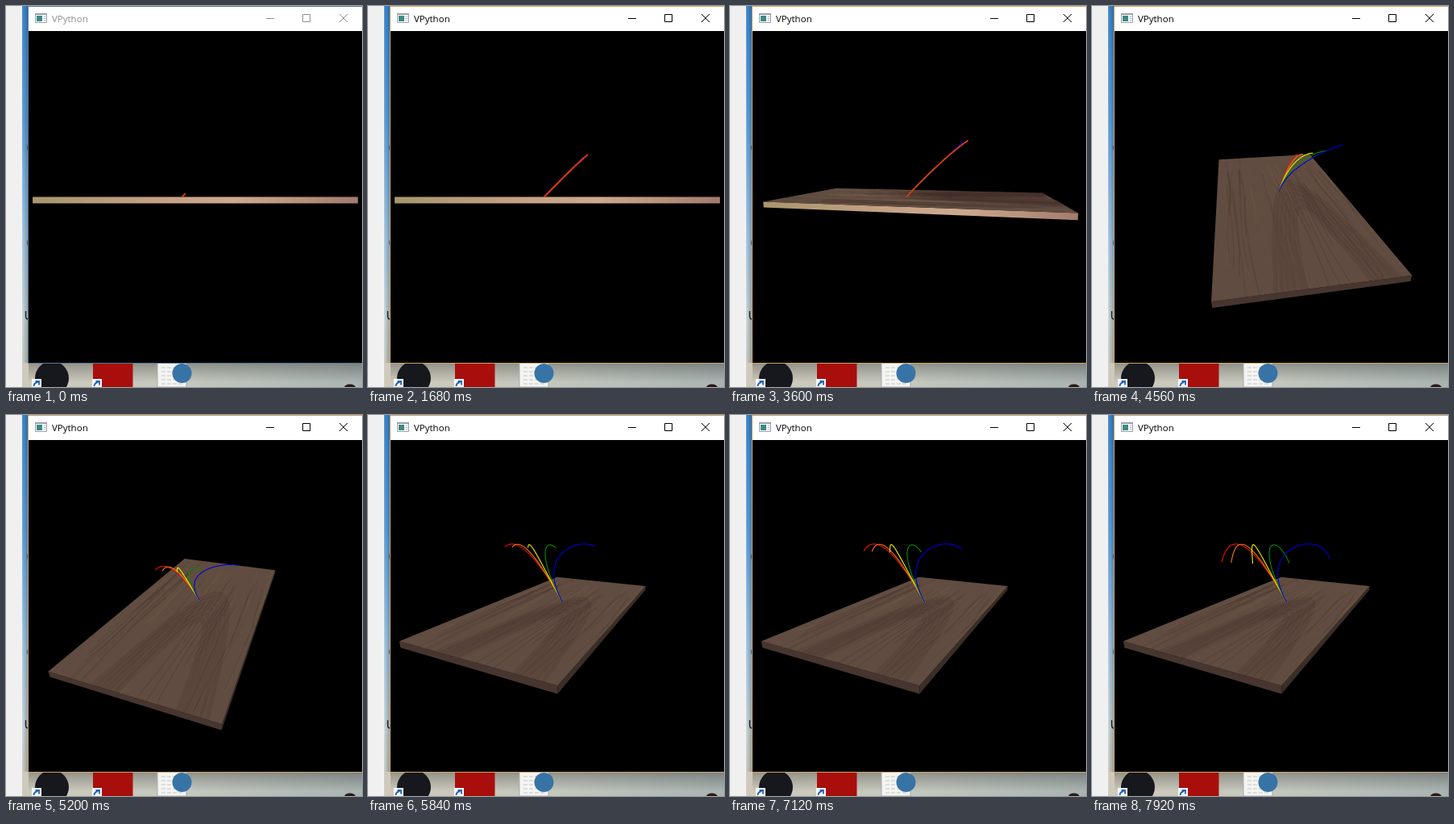
Animation, 442 px wide and 472 px high, one loop 8000 ms. Source, as an HTML page:

```html
<!DOCTYPE html>
<html lang="en">
<head>
<meta charset="utf-8">
<title>VPython</title>
<style>
  html, body { margin: 0; width: 100%; height: 100%; overflow: hidden; background: #f1f0f1; }
  svg { display: block; }
  text { font-family: "Open Sans", "Noto Sans", sans-serif; }
</style>
</head>
<body>
<svg id="stage" width="442" height="472" viewBox="0 0 442 472">
  <defs>
    <linearGradient id="sky" x2="0" y2="1">
      <stop offset="0" stop-color="#3f8cd6"/>
      <stop offset=".3" stop-color="#62a5e2"/>
      <stop offset=".6" stop-color="#a6cbe8"/>
      <stop offset=".82" stop-color="#ccd9dc"/>
      <stop offset="1" stop-color="#cfcabb"/>
    </linearGradient>
    <linearGradient id="ground">
      <stop offset="0" stop-color="#cfcabb"/>
      <stop offset=".5" stop-color="#c3c8be"/>
      <stop offset="1" stop-color="#a9b3b1"/>
    </linearGradient>
    <linearGradient id="shade">
      <stop offset="0" stop-color="#000" stop-opacity="0"/>
      <stop offset="1" stop-color="#000" stop-opacity=".28"/>
    </linearGradient>
    <linearGradient id="under" x2="0" y2="1">
      <stop offset="0" stop-color="#000" stop-opacity=".28"/>
      <stop offset=".8" stop-color="#000" stop-opacity="0"/>
    </linearGradient>
    <linearGradient id="tan">
      <stop offset="0" stop-color="#a8966c"/>
      <stop offset=".35" stop-color="#c3a082"/>
      <stop offset=".62" stop-color="#cdaa8f"/>
      <stop offset=".85" stop-color="#b58e78"/>
      <stop offset="1" stop-color="#a27b6e"/>
    </linearGradient>
  </defs>

  <!-- desktop -->
  <rect width="20" height="472" fill="#f1f0f1"/>
  <rect x="20" width="8" height="472" fill="url(#sky)"/>
  <rect x="20" y="442" width="422" height="30" fill="url(#ground)"/>
  <rect x="20" width="8" height="442" fill="url(#shade)"/>
  <rect x="28" y="442" width="414" height="30" fill="url(#under)"/>
  <path d="M24.500 378v6q0 4 3 4M28 171q-2 4 0 9M28 289q-2 4 0 9" fill="none" stroke="#1c1c2c" stroke-width="1.400"/>
  <ellipse cx="427" cy="473" rx="7" ry="4.500" fill="#2a1a18"/>
  <circle cx="57" cy="461" r="21" fill="#16181d"/>
  <rect x="108" y="432" width="49.500" height="40" fill="#a80f0c"/>
  <path d="M188 440h36v32h-36z" fill="#f4f4f2" stroke="#a9a9a9"/>
  <path d="M193 448h26M193 453h26M193 458h26M193 463h26M193 468h26" stroke="#c4c6ca" stroke-dasharray="5 2"/>
  <circle cx="218.500" cy="455" r="12" fill="#3873a5"/>
  <g id="links"></g>

  <!-- window -->
  <rect x="28" width="414" height="442" fill="#000"/>
  <rect x="28" width="414" height="31" fill="#fff"/>
  <path id="edge" d="M442 .5H27.500V442.500H442" fill="none"/>
  <path d="M36.500 9.500h14v11h-14z" fill="#fff" stroke="#9aa1a8"/>
  <path d="M36 10h15" stroke="#9aa1a8" stroke-width="2"/>
  <path d="M38 12h7v7h-7z" fill="#3c8a84"/>
  <path d="M46.500 13h3M46.500 15.500h3M46.500 18h3" stroke="#a8b4c4"/>
  <text id="title" x="57" y="20" font-size="11.500">VPython</text>
  <path id="buttons" d="M323 15.500h10M368.500 10.500h9v9h-9zM414 10l10 10M424 10l-10 10" fill="none"/>

  <g id="board"></g>
  <g id="trails" fill="none" stroke-linejoin="round"></g>
</svg>
<script>
const LOOP = 8000, STEP = 80;
const FOCAL = 358, CX = 235, CY = 236.5;
const A = 0.44, B = 0.22, H = 0.0175;   // half length, half width, thickness
const START_X = -0.045;

// time, yaw, pitch, flight time
const KEYS = [
  [0, 0, 0, .025], [400, 0, 0, .12], [560, 0, 0, .3], [640, 0, 0, .474],
  [2080, 0, 0, .474], [2320, 0, 0, .531], [3040, 1, .6, .667], [3120, 1, .6, .67],
  [3600, 12.6, 7.1, .734], [4080, 13, 7.4, .95], [4480, 68, 22, 1.13],
  [4720, 104, 35, 1.26], [4880, 109, 28.8, 1.36], [5200, 110.4, 28.5, 1.51],
  [5760, 116.5, 17.3, 1.68], [7120, 116.5, 17.3, 1.89], [7920, 116.5, 17.3, 2.254]
];
// colour and sideways spin of each ball
const BALLS = [['#f01000', 0], ['#f07814', .1], ['#f4f000', .3], ['#068c06', .63], ['#0000d8', 1.2]];

const $ = id => document.getElementById(id);
const add = (parent, attrs) => {
  const el = document.createElementNS('http://www.w3.org/2000/svg', 'path');
  for (const k in attrs) el.setAttribute(k, attrs[k]);
  return parent.appendChild(el);
};

function stateAt(t) {
  let i = 1;
  while (i < KEYS.length - 1 && KEYS[i][0] < t) i++;
  const a = KEYS[i - 1], b = KEYS[i];
  const u = Math.min(1, (t - a[0]) / (b[0] - a[0]));
  return a.map((v, k) => v + (b[k] - v) * u);
}

function camera(yaw, pitch) {
  const r = Math.PI / 180;
  const sy = Math.sin(yaw * r), cy = Math.cos(yaw * r);
  const sp = Math.sin(pitch * r), cp = Math.cos(pitch * r);
  return ([x, y, z]) => {
    const side = x * cy - z * sy, near = z * cy + x * sy;
    const k = FOCAL / (1 - near * cp - y * sp);
    return [CX + side * k, CY - (y * cp - near * sp) * k];
  };
}

const line = (pts, cam) => 'M' + pts.map(p => cam(p).map(v => v.toFixed(2)).join(' ')).join('L');

// linear drag, with the horizontal velocity turning at the spin rate
function flight(spin, s) {
  const e = Math.exp(-s), re = 1 - e * Math.cos(spin * s), im = e * Math.sin(spin * s);
  const n = 0.4 / (1 + spin * spin);
  const y = 1.396 * 0.4 * (1 - e) - 0.1355 * s;
  return [START_X + n * (re + spin * im), y, n * (im - spin * re)];
}

function trail(spin, end) {
  return Array.from({ length: 49 }, (_, i) => flight(spin, end * i / 48));
}

let seed = 11;
const rand = () => (seed = seed * 16807 % 2147483647) / 2147483647;

// wood grain: straight fibres, then soft nested arches opening to one end
function makeGrain() {
  const list = [];
  const put = (pts, color, width, opacity) => list.push({
    pts, el: add($('board'), { fill: 'none', stroke: color, 'stroke-width': width, opacity })
  });
  for (let i = 0; i < 60; i++) {
    const z = (rand() * 2 - 1) * B * .96, x = -A + rand() * A, len = .2 + rand() * .5, p = rand() * 6;
    const pts = [];
    for (let k = 0; k <= 8; k++) {
      const q = Math.min(A, x + len * k / 8);
      pts.push([q, 0, Math.max(-B, Math.min(B, z + .006 * Math.sin(q * 9 + p)))]);
    }
    put(pts, i % 2 ? '#43302b' : '#77604c', .8 + rand() * 1.2, .22);
  }
  for (let i = 0; i < 6; i++) {
    const tip = -.12 + i * .04, w = .185 - i * .012, pts = [];
    for (let k = -12; k <= 12; k++) {
      const u = k / 12;
      pts.push([tip + (A - tip) * u * u, 0, -.05 + w * Math.sqrt(A - tip) * u]);
    }
    put(pts, '#3a2320', 6, .13);
  }
  return list;
}

const face = (pts, fill) => ({ pts, el: add($('board'), { fill }) });
const faces = {
  front: face([[-A, 0, B], [A, 0, B], [A, -H, B], [-A, -H, B]], 'url(#tan)'),
  end: face([[A, 0, B], [A, 0, -B], [A, -H, -B], [A, -H, B]], '#47362f'),
  back: face([[A, 0, -B], [-A, 0, -B], [-A, -H, -B], [A, -H, -B]], '#3a2e27'),
  top: face([[-A, 0, B], [A, 0, B], [A, 0, -B], [-A, 0, -B]], '#604c40')
};
const grain = makeGrain();
const trails = BALLS.map(([stroke, spin]) => ({ spin, el: add($('trails'), { stroke }) }));

// shortcut badges
for (const x of [32, 107]) {
  add($('links'), { d: `M${x} 462h12v10h-12z`, fill: '#f6f8fa' });
  add($('links'), { d: `M${x + 2.5} 471q0-4 5-5M${x + 4.5} 465h4.500v4.500`, fill: 'none', stroke: '#1f62b5', 'stroke-width': 1.8 });
}

// area sign tells whether a face looks at the viewer
function facing(pts, cam) {
  const [a, b, c] = pts.map(cam);
  return (b[0] - a[0]) * (c[1] - a[1]) - (b[1] - a[1]) * (c[0] - a[0]) > 0;
}

let flipped = false;
function draw(t) {
  const [, yaw, pitch, s] = stateAt(t);
  const cam = camera(yaw, pitch), active = t >= 1680;

  $('title').setAttribute('fill', active ? '#000' : '#8c8c8c');
  $('buttons').setAttribute('stroke', active ? '#000' : '#8f8f8f');
  $('edge').setAttribute('stroke', active ? '#c9a468' : '#5a7894');

  for (const k in faces) {
    const { pts, el } = faces[k];
    const seen = k === 'top' ? pitch > 0 : facing(pts, cam);
    el.setAttribute('d', line(pts, cam) + 'Z');
    el.style.display = seen ? '' : 'none';
  }
  for (const g of grain) {
    g.el.style.display = pitch > 2 ? '' : 'none';
    g.el.setAttribute('d', line(g.pts, cam));
  }

  // the nearest trail goes on top
  const flip = yaw < 60;
  if (flip !== flipped) {
    flipped = flip;
    const order = flip ? [...trails].reverse() : trails;
    order.forEach(r => $('trails').appendChild(r.el));
  }
  for (const r of trails) {
    r.el.setAttribute('d', line(trail(r.spin, s), cam));
    r.el.setAttribute('stroke-width', t < 2480 ? 1.4 : 1.1);
  }
}

function tick() {
  draw(Math.floor(performance.now() % LOOP / STEP) * STEP);
  requestAnimationFrame(tick);
}
tick();
</script>
</body>
</html>
```
